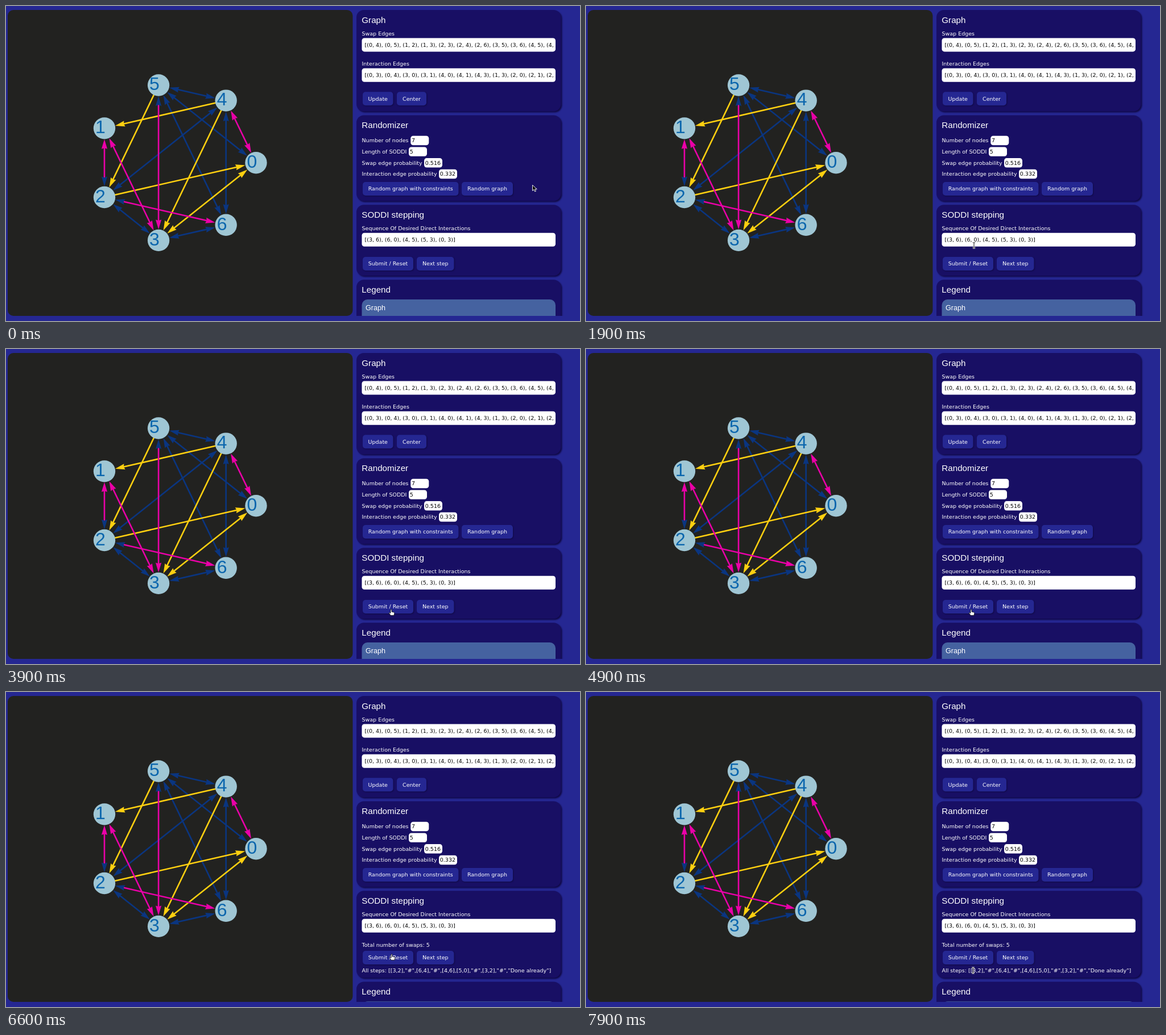
Recreate the animation shown at these times as an HTML page. Size 1009 by 555 pixels, loop 8 s.

```html
<!DOCTYPE html>
<html>
<head>
<meta charset="utf-8">
<style>
  html, body { margin: 0; width: 100%; height: 100%; overflow: hidden; background: #252792; }
  svg { display: block; }
  text { font: 9.5px "DejaVu Sans", sans-serif; fill: #fff; white-space: pre; }
  text.head { font: 15.2px "Liberation Sans", Arial, sans-serif; }
  text.sub { font: 12.6px "Liberation Sans", Arial, sans-serif; }
  text.digit { font: 32px "Liberation Sans", Arial, sans-serif; fill: #0b66ad; }
  text.dark { fill: #000; }
  .mid { text-anchor: middle; }
  .panel { fill: #180f64; filter: drop-shadow(2.5px 2.5px 1.2px #100947); }
  .button { fill: #252792; filter: drop-shadow(1.5px 1.5px 1px #0f0945); }
  .pressed .button { filter: none; }
  .pressed { transform: translate(1px, 1px); }
  .field { fill: #fff; }
</style>
</head>
<body>
<svg width="1009" height="555" viewBox="0 0 1009 555">
  <clipPath id="column"><rect x="610" width="399" height="546"/></clipPath>
  <rect x="3" y="7" width="606.5" height="539" rx="10" fill="#222220"/>
  <g id="graph"></g>
  <g id="side" clip-path="url(#column)"></g>
  <g id="cursor" stroke-linejoin="round"></g>
</svg>
<script>
const LOOP = 8000, SOLVED_AT = 5100;
const byId = id => document.getElementById(id);

// ---- Graph ----
const BLUE = '#0a3580', YELLOW = '#ffd010', PINK = '#ea00a8';
const RING = [0, 4, 5, 1, 2, 3, 6];
const nodes = [];
RING.forEach((label, i) => {
  const a = -i * 2 * Math.PI / 7;
  nodes[label] = { x: 299.3 + 140.2 * Math.cos(a), y: 276.2 + 140.2 * Math.sin(a) };
});

// [from, to, line colour, head colour at "to", head colour at "from"]
const edges = [
  ...[[4, 5], [0, 5], [2, 4], [4, 6], [5, 6], [2, 3], [3, 6]].map(e => [...e, BLUE, BLUE, BLUE]),
  [5, 2, YELLOW, YELLOW], [4, 1, YELLOW, YELLOW], [4, 3, YELLOW, YELLOW], [2, 0, YELLOW, YELLOW],
  [0, 3, YELLOW, YELLOW, YELLOW],
  [0, 4, PINK, PINK, PINK], [1, 3, PINK, PINK, PINK],
  [2, 1, PINK, PINK, BLUE], [5, 3, PINK, PINK, BLUE], [2, 6, PINK, PINK, BLUE]
];

function edge([from, to, color, endHead, startHead]) {
  const a = nodes[from], b = nodes[to];
  const length = Math.hypot(b.x - a.x, b.y - a.y);
  const angle = Math.atan2(b.y - a.y, b.x - a.x) * 180 / Math.PI;
  const head = (tip, dir, fill) => fill
    ? `<path d="M0 0L-17 5.1L-15.3 0L-17 -5.1Z" fill="${fill}" transform="translate(${tip}) scale(${dir} 1)"/>` : '';
  return `<g transform="translate(${a.x} ${a.y}) rotate(${angle})">
    <path d="M${startHead ? 34 : 18} 0H${length - 34}" stroke="${color}" stroke-width="2.6"/>
    ${head(length - 19.5, 1, endHead)}${head(19.5, -1, startHead)}</g>`;
}

byId('graph').innerHTML = edges.map(edge).join('') + nodes.map((n, i) =>
  `<circle cx="${n.x}" cy="${n.y}" r="19.2" fill="#9fc6d4"/>
   <text class="digit" x="${n.x - 16}" y="${n.y + 8.8}">${i}</text>`).join('');

// ---- Side panels; text is placed by the middle of its line ----
const box = (cls, x, y, w, h, r) =>
  `<rect class="${cls}" x="${x}" y="${y}" width="${w}" height="${h}" rx="${r}"/>`;
const text = (x, y, str, cls = '') => {
  const size = cls === 'head' ? 15.2 : cls === 'sub' ? 12.6 : 9.5;
  return `<text class="${cls}" x="${x}" y="${y + size * .355}">${str}</text>`;
};
const panel = (y, h, title) => box('panel', 616, y, 359.5, h, 13) + text(625.3, y + 17.3, title, 'head');
const button = (x, y, w, str) => box('button', x, y, w, 24, 5) + text(x + w / 2, y + 12, str, 'mid');
const wideField = (y, str) => box('field', 625.5, y - 12, 340.5, 24, 4.5) + text(630.5, y, str, 'dark');
const smallField = (y, label, x, value) => text(625.5, y, label) +
  box('field', x, y - 8.2, 32, 16.4, 4.5) + text(x + 1.8, y, value, 'dark');

byId('side').innerHTML =
  panel(7, 178.5, 'Graph') +
  text(625.5, 48.3, 'Swap Edges') +
  wideField(68.4, '[(0, 4), (0, 5), (1, 2), (1, 3), (2, 3), (2, 4), (2, 6), (3, 5), (3, 6), (4, 5), (4,') +
  text(625.5, 102, 'Interaction Edges') +
  wideField(121.7, '[(0, 3), (0, 4), (3, 0), (3, 1), (4, 0), (4, 1), (4, 3), (1, 3), (2, 0), (2, 1), (2,') +
  button(627, 151.3, 53.5, 'Update') + button(687, 151.3, 52, 'Center') +

  panel(192.5, 151, 'Randomizer') +
  smallField(237, 'Number of nodes', 711.3, '7') +
  smallField(256.6, 'Length of SODDI', 708, '5') +
  smallField(276.3, 'Swap edge probability', 735, '0.516') +
  smallField(296, 'Interaction edge probability', 761, '0.332') +
  button(627, 310, 168.5, 'Random graph with constraints') + button(801, 310, 90, 'Random graph') +

  `<g id="stepping">${panel(350.3, 125, 'SODDI stepping')}</g>` +
  text(625.5, 392, 'Sequence Of Desired Direct Interactions') +
  wideField(411.8, '[(3, 6), (6, 0), (4, 5), (5, 3), (0, 3)]') +
  `<g id="actions"><g id="submit">${button(627, 442, 89, 'Submit / Reset')}</g>` +
  button(722, 442, 65.5, 'Next step') + '</g><g id="result">' +
  text(625.5, 445.8, 'Total number of swaps: 5') +
  text(625.5, 490.7, 'All steps: [[3,2],"#",[6,4],"#",[4,6],[5,0],"#",[3,2],"#","Done already"]') + '</g>' +

  '<g id="legend">' + panel(482.2, 130, 'Legend') +
  '<rect x="625.5" y="517" width="340.5" height="80" rx="10" fill="#4562a0"/>' +
  text(632, 531.3, 'Graph', 'sub') + '</g>';

// ---- Pointer ----
const shapes = {
  arrow: '<path d="M.5 .5V10.5L3 8.3L4.7 12L6.5 11.2L4.9 7.7H8.3Z" fill="#111" stroke="#fff" stroke-width=".9"/>',
  beam: ['#fff" stroke-width="2.6', '#111" stroke-width="1'].map(s =>
    `<path d="M-2.2 -4.7H-.8L0 -4L.8 -4.7H2.2M0 -4V4M-2.2 4.7H-.8L0 4L.8 4.7H2.2" fill="none" stroke="${s}"/>`).join(''),
  hand: '<path d="M-1 .3Q0 -.7 1 .3V4L5 5Q6 5.3 5.8 6.5L5 10.3H-.8L-3.8 6.2Q-3.4 4.8 -1 6.5Z" fill="#fff" stroke="#111" stroke-width=".8"/>'
};
const path = [
  [0, 925, 315], [1000, 925, 315], [1400, 782, 410], [1500, 782, 410], [1700, 735, 426],
  [1900, 682, 421.5], [2000, 682, 421.5], [2300, 638, 412], [2500, 638, 412], [2800, 726, 410.5],
  [3200, 792, 410], [3500, 792, 410], [3900, 677, 459], [6500, 677, 459], [6600, 678, 462],
  [6800, 690, 474], [7000, 697, 490], [7200, 690, 498], [7400, 678, 498], [7500, 678, 498],
  [7900, 680.5, 490.5], [LOOP, 680.5, 490.5]
];

function pointerAt(t) {
  const i = path.findIndex(p => p[0] > t);
  const [t0, x0, y0] = path[i - 1], [t1, x1, y1] = path[i];
  const k = (t - t0) / (t1 - t0);
  return { x: x0 + (x1 - x0) * k, y: y0 + (y1 - y0) * k };
}

function pointerShape({ x, y }, solved) {
  const top = solved ? 456 : 442;
  if (y > 400 && y < 424 || solved && y > 485 && y < 497) return 'beam';
  return y > top && y < top + 24 && x < 716 ? 'hand' : 'arrow';
}

function draw(now) {
  const t = Math.floor(now % LOOP / 100) * 100;  // the screen refreshes ten times a second
  const solved = t >= SOLVED_AT;
  byId('stepping').querySelector('rect').setAttribute('height', solved ? 153.3 : 125);
  byId('actions').setAttribute('transform', `translate(0 ${solved ? 14 : 0})`);
  byId('legend').setAttribute('transform', `translate(0 ${solved ? 28.3 : 0})`);
  byId('result').setAttribute('visibility', solved ? 'visible' : 'hidden');
  byId('submit').setAttribute('class', t === 4800 ? 'pressed' : '');
  const p = pointerAt(t);
  byId('cursor').setAttribute('transform', `translate(${p.x} ${p.y})`);
  byId('cursor').innerHTML = shapes[pointerShape(p, solved)];
}

const start = performance.now();
function tick() {
  draw(performance.now() - start);
  requestAnimationFrame(tick);
}
tick();
</script>
</body>
</html>
```
